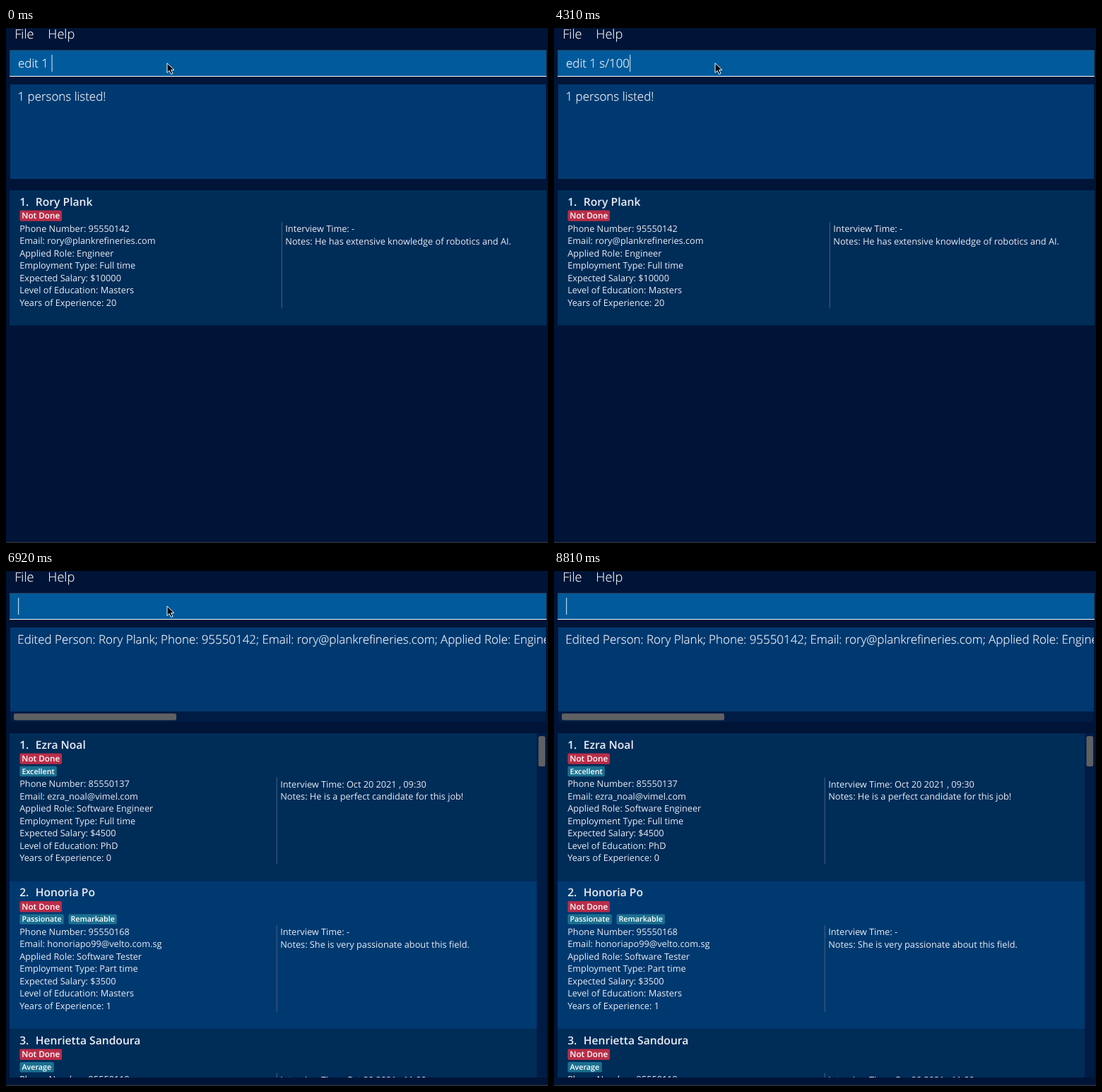
An HTML page for the animation above (9050 ms loop, 767 by 730 pixels).

```html
<!DOCTYPE html>
<html lang="en">
<head>
<meta charset="utf-8">
<title>Candidate list</title>
<style>
  html, body { margin: 0; width: 100%; height: 100%; overflow: hidden; background: #001437; }
  svg { display: block; width: 767px; height: 730px; }
  text { font-family: "Open Sans", sans-serif; fill: #e9eef4; white-space: pre; text-rendering: geometricPrecision; }
  .menu, .big { font-weight: 300; fill: #fff; stroke: #fff; stroke-width: .15px; }
  .menu { font-size: 18.2px; }
  .big { font-size: 16.95px; }
  .name { font-size: 15.65px; font-weight: 600; }
  .cell { font-size: 12.72px; }
  .status { font-size: 11.74px; font-weight: 600; fill: #fff; }
  .tag { font-size: 10.76px; font-weight: 600; fill: #fff; }
</style>
</head>
<body>
<svg id="stage" viewBox="0 0 767 730"></svg>
<script>
const LOOP = 9050;
const ROW = 209.6, LINE = 17.5;

const rect = (x, y, w, h, fill, r = 0) =>
  `<rect x="${x}" y="${y}" width="${w}" height="${h}" rx="${r}" fill="${fill}"/>`;
const text = (x, y, cls, s) => `<text x="${x}" y="${y}" class="${cls}">${s}</text>`;

// One candidate card; tags are [label, x, width].
function card(top, fill, width, height, noteX, p) {
  const shift = p.tags ? LINE : 0;
  const base = top + 58.5 + shift;
  const labels = ["Phone Number", "Email", "Applied Role", "Employment Type",
    "Expected Salary", "Level of Education", "Years of Experience"];
  return rect(5, top, width, height, fill) +
    text(19.2, top + 21.5, "name", p.index + ".") +
    text(41.8, top + 21.5, "name", p.name) +
    rect(19.4, top + 28.4, 59.6, 15.4, "#b92d48", 2) +
    text(22.2, top + 40.2, "status", "Not Done") +
    (p.tags || []).map(([s, x, w]) =>
      rect(x, top + 46.8, w, 14.4, "#1c7090", 2) + text(x + 3, top + 57.7, "tag", s)).join("") +
    labels.map((s, i) => text(19.2, base + i * LINE, "cell", `${s}: ${p.info[i]}`)).join("") +
    rect(noteX - 5.5, base - 13.5, 1, 122.5, "#49627f") +
    text(noteX, base + .8, "cell", "Interview Time: " + p.time) +
    text(noteX, base + .8 + LINE, "cell", "Notes: " + p.notes);
}

const rory = {
  index: 1, name: "Rory Plank", time: "-",
  notes: "He has extensive knowledge of robotics and AI.",
  info: ["95550142", "rory@plankrefineries.com", "Engineer", "Full time", "$10000", "Masters", "20"]
};
const people = [
  { index: 1, name: "Ezra Noal", tags: [["Excellent", 19.4, 52.4]], time: "Oct 20 2021 , 09:30",
    notes: "He is a perfect candidate for this job!",
    info: ["85550137", "ezra_noal@vimel.com", "Software Engineer", "Full time", "$4500", "PhD", "0"] },
  { index: 2, name: "Honoria Po", tags: [["Passionate", 19.4, 62.4], ["Remarkable", 88.5, 68.4]], time: "-",
    notes: "She is very passionate about this field.",
    info: ["95550168", "honoriapo99@velto.com.sg", "Software Tester", "Part time", "$3500", "Masters", "1"] },
  { index: 3, name: "Henrietta Sandoura", tags: [["Average", 19.4, 48.4]], time: "Oct 20 2021 , 11:00",
    notes: "-",
    info: ["95550119", "-", "-", "-", "-", "-", "-"] }
];

const before = rect(6, 80, 758, 134, "#003970") +
  text(16.5, 103.2, "big", "1 persons listed!") +
  card(230, "#002c58", 760, 191.5, 395.3, rory);

const after = rect(6, 80, 758, 119, "#003970") + rect(6, 199, 758, 15, "#001c45") +
  `<g clip-path="url(#result)">` + text(16.3, 103.2, "big",
    `Edited Person: ${rory.name}; Phone: ${rory.info[0]}; Email: ${rory.info[1]}; Applied Role: Engineer`) + `</g>` +
  rect(11, 202, 230, 9.5, "#5f6063", 2.5) +
  `<g clip-path="url(#list)">` + people.map((p, i) =>
    card(230 + i * ROW, i % 2 ? "#003970" : "#002c58", 746, ROW, 388.2, p)).join("") + `</g>` +
  rect(751, 230, 14, 488, "#001c45") + rect(753.5, 234, 9.5, 43, "#5f6063", 2.5);

const beam = "M-3 -7.5Q0 -7.5 0 -5V5Q0 7.5 -3 7.5M3 -7.5Q0 -7.5 0 -5M0 5Q0 7.5 3 7.5M-1.5 1.5H1.5";

document.getElementById("stage").innerHTML = `
  <defs>
    <clipPath id="result"><rect x="6" y="80" width="758" height="119"/></clipPath>
    <clipPath id="list"><rect x="5" y="230" width="746" height="488"/></clipPath>
  </defs>` +
  rect(0, 0, 767, 730, "#001437") +
  text(12.2, 15.2, "menu", "File") + text(59.3, 15.2, "menu", "Help") +
  rect(5, 31, 760, 38, "#26405a") + rect(6, 32, 758, 36, "#005a9b") + rect(5, 68, 760, 1, "#fff") +
  `<g id="before">${before}</g><g id="after">${after}</g>` +
  rect(0, 728.5, 767, 1.5, "#2c2f38") +
  `<text id="input" x="17" y="56.4" class="big"></text>
  <rect id="caret" y="38" width="1" height="24" fill="#e4eef8"/>
  <path id="arrow" d="M0 0V13.5L3.2 10.6L5.6 15.8L8 14.7L5.7 9.6H9.9Z" fill="#000" stroke="#fff" stroke-width="1"/>
  <g id="beam" fill="none" stroke-linecap="square">
    <path d="${beam}" stroke="#fff" stroke-width="2.8"/>
    <path d="${beam}" stroke="#000" stroke-width="1"/>
  </g>`;

const $ = id => document.getElementById(id);
const show = (id, on) => $(id).setAttribute("visibility", on ? "visible" : "hidden");

const command = "edit 1 s/10001";
// [time, typed characters]
const typing = [[0, 7], [1620, 8], [1790, 9], [3590, 10], [3770, 11], [4310, 12], [5480, 13], [6290, 14], [6920, 0]];
// [time, caret shown]
const blink = [[0, 1], [360, 0], [900, 1], [1350, 0], [1620, 1], [2330, 0], [2780, 1], [3320, 0], [3590, 1],
  [4220, 0], [4310, 1], [4760, 0], [5300, 1], [6020, 0], [6290, 1], [7370, 0], [7820, 1], [8360, 0], [8810, 1]];
// [time, pointer, x, y]
const mouse = [[0, "arrow", 228, 49.8], [7550, "beam", 224, 150], [7640, "arrow", 218, 238],
  [7730, "beam", 172, 184], [7820, "beam", 125.8, 117.2], [8000, "arrow", 325, 345], [8090, "arrow", 490, 557],
  [8270, "arrow", 620, 646], [8360, "arrow", 716, 702], [8540, "arrow", 716, 712], [8630, "arrow", 715, 721],
  [8720, "", 0, 0]];

const at = (steps, t) => steps.findLast(s => s[0] <= t);

function draw(now) {
  const t = now % LOOP;
  const count = at(typing, t)[1];
  const input = $("input");
  input.textContent = command.slice(0, count);
  $("caret").setAttribute("x", 17.2 + (count ? input.getComputedTextLength() : 0));
  show("caret", at(blink, t)[1]);
  show("before", t < 6920);
  show("after", t >= 6920);
  const [, kind, x, y] = at(mouse, t);
  for (const id of ["arrow", "beam"]) {
    show(id, id === kind);
    $(id).setAttribute("transform", `translate(${x} ${y})`);
  }
  requestAnimationFrame(draw);
}
draw(performance.now());
</script>
</body>
</html>
```
